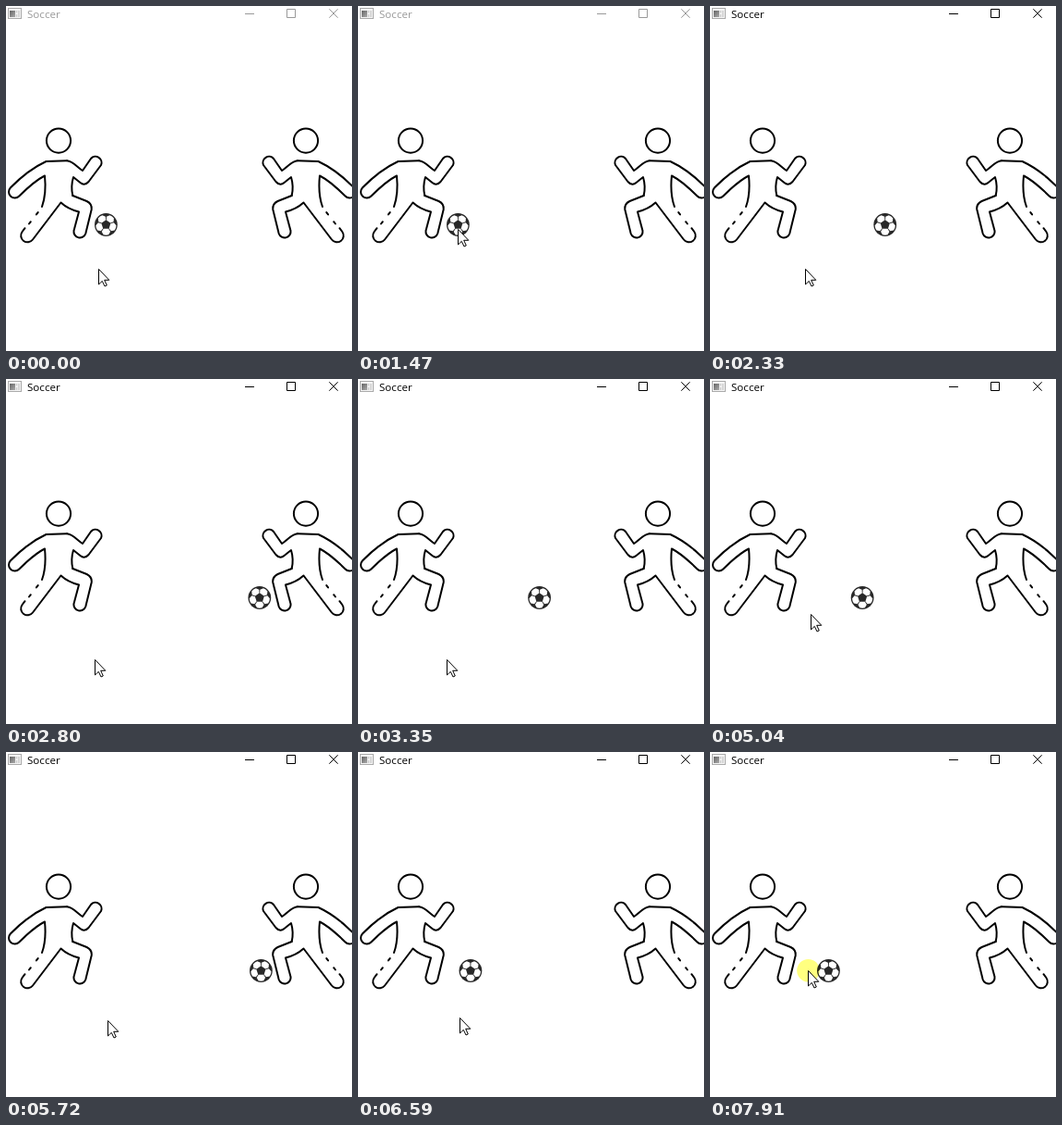
Write an HTML page that moves like this. It is 375 by 373 pixels and loops after 8 s.

```html
<!DOCTYPE html>
<html lang="en">
<head>
<meta charset="utf-8">
<title>Soccer</title>
<style>
  html, body { margin: 0; width: 100%; height: 100%; overflow: hidden; background: #fff; }
  svg { display: block; width: 100vw; height: 100vh; }
  #chrome { color: #999; }
  #chrome.active { color: #000; }
  #chrome text { font: 11.6px "Open Sans", "Noto Sans", sans-serif; fill: currentColor; }
  .controls { fill: none; stroke: currentColor; }
  .player { fill: none; stroke: #000; stroke-width: 2; stroke-linecap: round; stroke-linejoin: round; }
  #glow { fill: #ffff80; mix-blend-mode: multiply; }
</style>
</head>
<body>
<svg viewBox="0 0 375 373" preserveAspectRatio="none">
  <defs>
    <linearGradient id="pane" x2="1" y2="1">
      <stop stop-color="#666"/><stop offset="1" stop-color="#aaa"/>
    </linearGradient>
    <g id="player" class="player">
      <circle cx="57" cy="145.6" r="13.1"/>
      <!-- torso side and left arm -->
      <path d="M39 217Q44 203 42 183.5Q31 189 14.3 205.5A6.5 6.5 0 0 1 4.8 196.5Q24 177 43.5 168L66 167.300"/>
      <!-- right arm and torso side -->
      <path d="M66 167.300C72 167.500 77 174 83 178L92 165A6.600 6.600 0 0 1 103 172L89.500 190Q85 195 80.500 191L73 185Q70 195 72.300 205"/>
      <!-- bent leg and stretched leg -->
      <path d="M72.300 205L87.500 211Q93.500 214 92.700 220L86.300 246A6.600 6.600 0 0 1 73.500 243L79 222.500Q67 219.500 59.500 212.500L29 252.500A7 7 0 0 1 17.600 244L20.500 240.200"/>
      <path d="M25 235.500l1.800-2.300M32.900 225.400l1.800-2.300"/>
    </g>
  </defs>

  <g id="chrome">
    <rect x="2.5" y="2.5" width="14" height="11" fill="#f4f4f4" stroke="#aaa"/>
    <rect x="4" y="5" width="6" height="7" fill="url(#pane)"/>
    <path d="M11.5 5v2.5M14 5v7M11.5 9v3" stroke="#ccc" stroke-width="1.5"/>
    <text x="23" y="13">Soccer</text>
    <path class="controls" d="M259 8.500h10M304.500 3.500h9v9h-9zM350.300 3.300l9.400 9.400m0-9.400l-9.400 9.400"/>
  </g>

  <use href="#player"/>
  <use href="#player" transform="matrix(-1 0 0 1 382 0)"/>

  <g id="ball">
    <circle r="12.4" fill="#282828"/>
    <g id="patches" fill="#fff"></g>
  </g>
  <circle id="glow" r="12.3"/>
  <path id="cursor" d="M.5.5V17L4.300 13.400L7 19L9.300 18L6.700 12.300H11.800Z" fill="#fff" stroke="#000"/>
</svg>

<script>
const LOOP = 8000;
const TICK = 77.5, PHASE = 62, LEAD = 20;   // screen refresh rhythm, ms
const HOME = 108.4, AWAY = 276.4;           // ball centre at each player
const SPEED = 0.183, REST = 98;             // px per ms, ms at the far player
const KICKS = [1885, 4732, 7800];

// Cursor moves: start, end, x, y
const START = [100, 284];
const MOVES = [
  [830, 1600, 109, 238], [1900, 2330, 103, 284], [2350, 2640, 96, 303],
  [3500, 4190, 99, 274], [4190, 4570, 109, 240], [4800, 5500, 110, 290],
  [5750, 6500, 110, 287], [6750, 7200, 109, 229], [7450, 7750, 106, 236]
];

const $ = id => document.getElementById(id);
const clamp = (v, lo, hi) => Math.min(hi, Math.max(lo, v));
const smooth = k => k * k * (3 - 2 * k);
const place = (id, x, y) => $(id).setAttribute("transform", `translate(${x} ${y})`);

function ballX(t) {
  const since = t - (KICKS.findLast(kick => kick <= t) ?? -LOOP);
  const span = AWAY - HOME;
  const out = clamp(since * SPEED, 0, span);
  const back = clamp((since - REST) * SPEED - span, 0, span);
  return HOME + out - back;
}

function cursorAt(t) {
  let [x, y] = START;
  for (const [from, to, toX, toY] of MOVES) {
    const k = smooth(clamp((t - from) / (to - from), 0, 1));
    x += (toX - x) * k;
    y += (toY - y) * k;
  }
  return [Math.round(x), Math.round(y)];
}

for (let i = 0; i < 5; i++) {
  $("patches").innerHTML +=
    `<path transform="rotate(${i * 72})" d="M-2.7 4.3H2.7L4.7 7.4L2.8 10.7Q0 11.6-2.8 10.7L-4.7 7.4Z"/>`;
}

function draw(now) {
  const t = Math.floor((now % LOOP - PHASE) / TICK) * TICK + PHASE + LEAD;
  const [x, y] = cursorAt(t);
  const pressed = KICKS.some(kick => t > kick - 50 && t < kick + 170);
  $("chrome").classList.toggle("active", t > KICKS[0] - 40);
  place("ball", ballX(t), 236.5);
  place("cursor", x, y);
  place("glow", x + .5, y + .3);
  $("glow").style.display = pressed ? "" : "none";
}

function frame() {
  draw(performance.now());
  requestAnimationFrame(frame);
}
frame();
</script>
</body>
</html>
```
